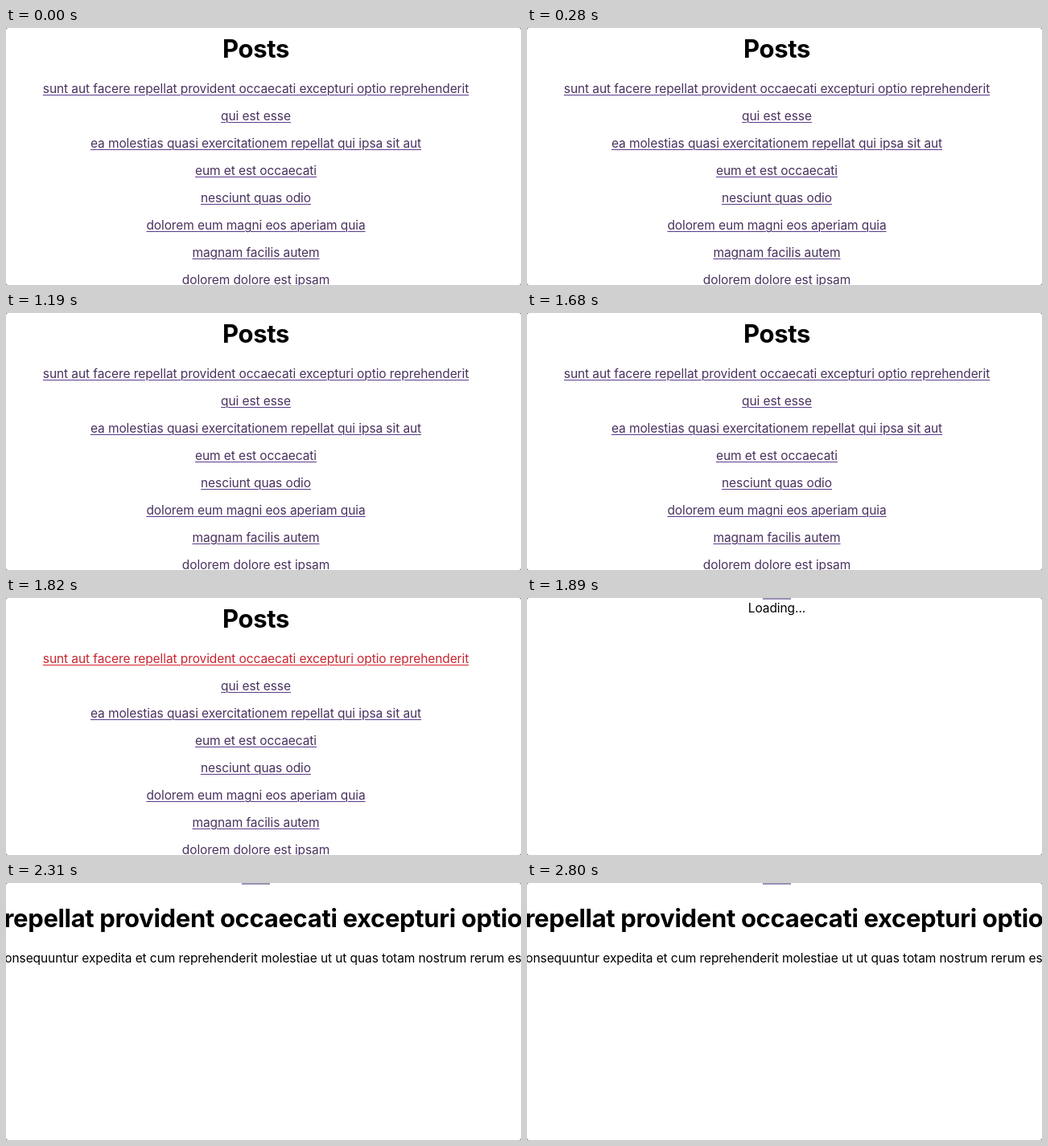
An HTML page that plays this animation: 640 by 320 pixels, repeating every 3.92 s.

```html
<!DOCTYPE html>
<html lang="en">
<head>
<meta charset="utf-8">
<title>Posts</title>
<style>
  html, body { margin: 0; width: 100%; height: 100%; overflow: hidden; background: #777; }
  .stage {
    position: relative; width: 640px; height: 320px; overflow: hidden;
    border-radius: 3px; background: #fff; color: #000;
    font: 15.5px/34px Inter, sans-serif; letter-spacing: -0.087px;
  }
  .view { position: absolute; inset: 0; animation: 3920ms step-end infinite; }
  .list { animation-name: list; }
  .loading { animation-name: loading; }
  .post { animation-name: post; }
  h1, p { position: absolute; margin: 0; white-space: nowrap; }
  h1 { font-size: 31px; font-weight: 700; letter-spacing: -0.33px; }
  .centered { left: 0; width: 621px; text-align: center; }
  .links { top: 59px; }
  .links span {
    display: block; color: #49325f;
    text-decoration: underline 1px #5a3a8c; text-underline-offset: 1.5px;
  }
  .links .pressed { animation: press 3920ms step-end infinite; }
  .bar {
    position: absolute; left: 293px; top: 0; width: 35px; height: 2px;
    background: #9a8fb4; animation: bar 3920ms step-end infinite;
  }
  /* list until 1890 ms, loading until 1960 ms, then the post */
  @keyframes list { 0% { visibility: visible } 48.2143%, 100% { visibility: hidden } }
  @keyframes loading { 0%, 50%, 100% { visibility: hidden } 48.2143% { visibility: visible } }
  @keyframes post { 0% { visibility: hidden } 50%, 100% { visibility: visible } }
  @keyframes bar { 0% { visibility: hidden } 48.2143%, 100% { visibility: visible } }
  @keyframes press {
    0% { color: #49325f; text-decoration-color: #5a3a8c }
    44.6429%, 100% { color: #c8242f; text-decoration-color: #d8202c }
  }
</style>
</head>
<body>
<div class="stage">
  <div class="view list">
    <h1 class="centered" style="top:9px">Posts</h1>
    <p class="centered links">
      <span class="pressed">sunt aut facere repellat provident occaecati excepturi optio reprehenderit</span>
      <span>qui est esse</span>
      <span>ea molestias quasi exercitationem repellat qui ipsa sit aut</span>
      <span>eum et est occaecati</span>
      <span>nesciunt quas odio</span>
      <span>dolorem eum magni eos aperiam quia</span>
      <span>magnam facilis autem</span>
      <span>dolorem dolore est ipsam</span>
    </p>
  </div>
  <div class="view loading">
    <p class="centered" style="top:-4px">Loading...</p>
  </div>
  <div class="view post">
    <h1 style="left:-2.5px;top:27px">repellat provident occaecati excepturi optio reprehenderit</h1>
    <p style="left:-10.5px;top:77px">consequuntur expedita et cum reprehenderit molestiae ut ut quas totam nostrum rerum est</p>
  </div>
  <div class="bar"></div>
</div>
</body>
</html>
```
